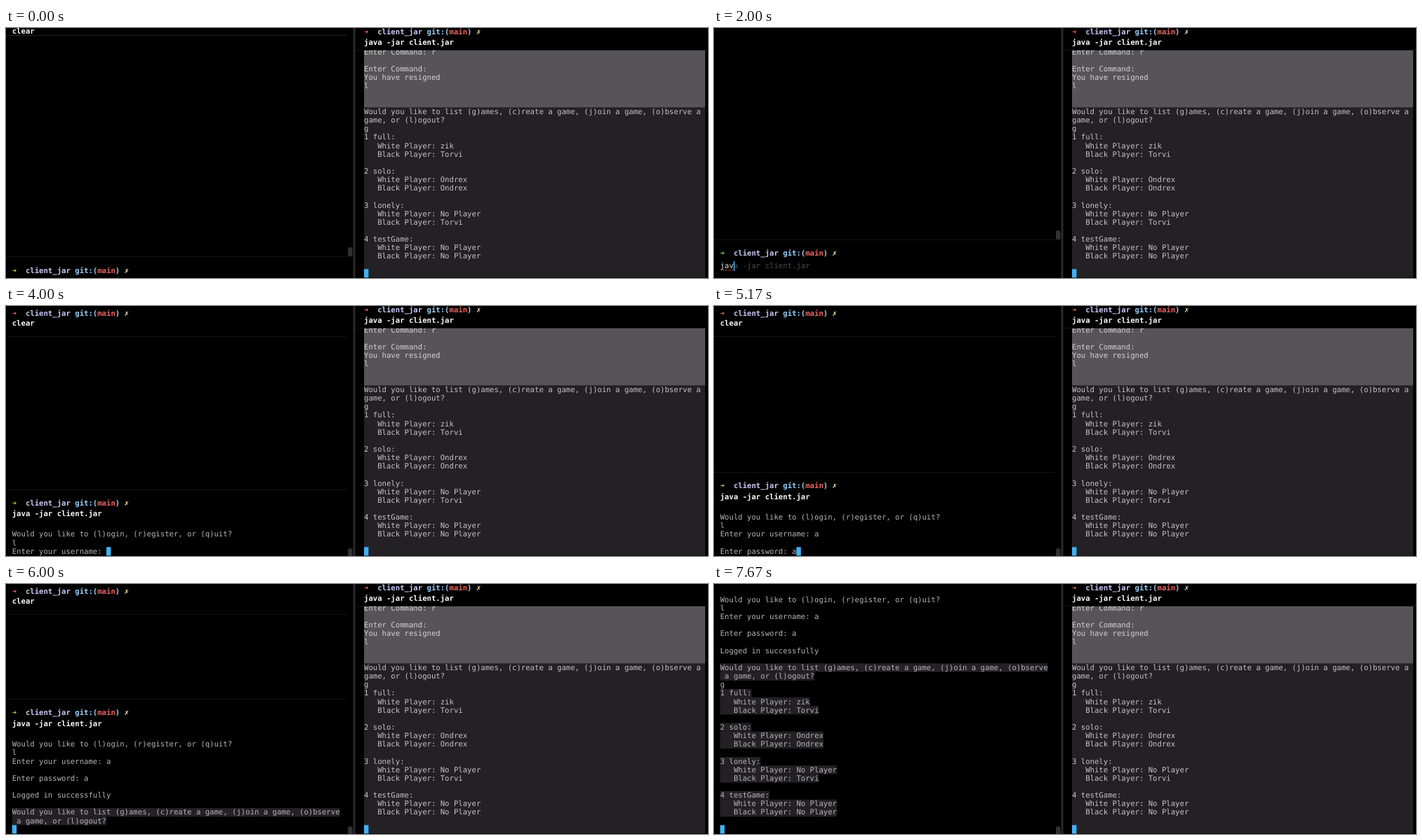
An HTML page with a canvas for the animation above (8 s loop, 1000x357 px).

```html
<!DOCTYPE html>
<html lang="en">
<head>
<meta charset="utf-8">
<title>Two terminals</title>
<style>
  html, body { margin: 0; width: 100%; height: 100%; overflow: hidden; background: #000; }
  canvas { display: block; width: 1000px; height: 357px; }
</style>
</head>
<body>
<canvas id="stage"></canvas>
<script>
const WIDTH = 1000, HEIGHT = 357, LOOP = 8000;
const ROW = 12.15, CELL = 6.395, BOTTOM = 356.4, BASELINE = 9.5;
const LEFT = 8.7, RIGHT = 510;
const TEXT = "#b4b4b4", BRIGHT = "#fafafa", CURSOR = "#3fb1f5", PANEL = "#232124", RULE = "#131313";
const COMMAND = "java -jar client.jar";

const canvas = document.getElementById("stage");
const ctx = canvas.getContext("2d");
const ratio = window.devicePixelRatio || 1;
canvas.width = WIDTH * ratio;
canvas.height = HEIGHT * ratio;
ctx.scale(ratio, ratio);
ctx.textRendering = "geometricPrecision";

const games = [
  ["full", "zik", "Torvi"],
  ["solo", "Ondrex", "Ondrex"],
  ["lonely", "No Player", "Torvi"],
  ["testGame", "No Player", "No Player"],
].map(([name, white, black], i) =>
  `${i + 1} ${name}:\n   White Player: ${white}\n   Black Player: ${black}\n\n`).join("");
const menu = "Would you like to list (g)ames, (c)reate a game, (j)oin a game, (o)bserve";

const rightLines = ("Enter Command: r\n\nEnter Command:\nYou have resigned\nl\n\n\n" +
  menu + " a\ngame, or (l)ogout?\ng\n" + games).split("\n");

// Input line before the command runs: [time, typed text, caret visible]
const typing = [
  [170, "", true], [670, "", false], [1000, "", true],
  [1670, "j", true], [1830, "ja", true], [2000, "jav", true],
  [2170, "java", true], [2330, COMMAND, true],
];
// Output of the running program: [time, appended text]
const RUN = 2500, CURSOR_SHOWN = 3000;
const output = [
  [RUN, ""],
  [2830, "\nWould you like to (l)ogin, (r)egister, or (q)uit?\n"],
  [3000, "l"],
  [3170, "\nEnter your username: "],
  [4170, "a"],
  [4500, "\n\nEnter password: "],
  [5000, "a"],
  [5330, "\n\n"],
  [5830, "Logged in successfully\n\n" + menu + "\n a game, or (l)ogout?\n"],
  [7170, "g"],
  [7500, "\n" + games],
];
const shaded = /^(Would you like to list| a game|\d |   )/;

function box(x, y, w, h, color) {
  ctx.fillStyle = color;
  ctx.fillRect(x, y, w, h);
}

// Draws text on the terminal's character grid.
function write(x, column, baseline, text, color, weight = "normal") {
  ctx.font = `${weight} ${CELL / 0.602}px "DejaVu Sans Mono", monospace`;
  ctx.fillStyle = color;
  [...text].forEach((char, i) => {
    if (char !== " ") ctx.fillText(char, x + (column + i) * CELL, baseline);
  });
}

function prompt(x, baseline, arrow) {
  const part = (column, text, color) => write(x, column, baseline, text, color, "bold");
  part(0, "➜", arrow);
  part(3, "client_jar", "#c8c9f6");
  part(14, "git:(", "#9bd0fb");
  part(19, "main", "#f0625c");
  part(23, ")", "#9bd0fb");
  part(25, "✗", "#fbeeb4");
}

function blockCursor(x, column) {
  box(x + column * CELL, BOTTOM - ROW, CELL, ROW, CURSOR);
}

function scrollThumb(y, h) {
  ctx.fillStyle = "#303030";
  ctx.beginPath();
  ctx.roundRect(487, y, 6.5, h, 3);
  ctx.fill();
}

function drawRight() {
  box(494.5, 0, 3, HEIGHT, "#2a2a2a");
  box(498, 31, 502, 1, RULE);
  prompt(RIGHT, 9, "#ee5f59");
  write(RIGHT, 0, 24, COMMAND, BRIGHT, "bold");
  ctx.save();
  ctx.beginPath();
  ctx.rect(498, 32, 502, HEIGHT - 32);
  ctx.clip();
  box(510, 32, 486, BOTTOM - 32, PANEL);
  box(510, 32, 486, 81.3, "#565457");
  const top = BOTTOM - rightLines.length * ROW;
  rightLines.forEach((line, i) =>
    write(RIGHT, 0, top + i * ROW + BASELINE, line, i < 7 ? "#d2d2d2" : "#c4c4c4"));
  blockCursor(RIGHT, 0);
  ctx.restore();
}

function drawIdle() {
  write(LEFT, 0, 8, "clear", BRIGHT, "bold");
  box(0, 10, 486, 1, "#222");
  box(0, 326, 486, 1, RULE);
  scrollThumb(313, 13.5);
  prompt(LEFT, 349.5, "#9fd648");
}

function drawInput(time) {
  const [, typed, caret] = typing.filter(step => step[0] <= time).pop();
  box(0, 302, 486, 1, RULE);
  scrollThumb(289, 13.5);
  prompt(LEFT, 325, "#7fdc4a");
  write(LEFT, 0, 343, typed, "#dedede");
  if (typed) write(LEFT, typed.length, 343, COMMAND.slice(typed.length), "#4e4e4e");
  const end = LEFT + typed.length * CELL;
  if (typed.length < 4)
    for (let x = 10; x < end - 1; x += 3) box(x, 345, 1.7, 1.2, "#e0605a");
  if (caret) box(end, 333, 1.5, 14, CURSOR);
}

function drawRunning(time) {
  const lines = output.filter(step => step[0] <= time).map(step => step[1]).join("").split("\n");
  const top = BOTTOM - lines.length * ROW;
  const rule = top - 46.2;

  const shift = Math.min(0, rule - 43);
  prompt(LEFT, 13.5 + shift, "#e8606a");
  write(LEFT, 0, 28.3 + shift, "clear", BRIGHT, "bold");
  box(0, 43 + shift, 486, 1, RULE);

  box(0, Math.round(rule), 486, 1, RULE);
  prompt(LEFT, rule + 23, "#8fdc4c");
  write(LEFT, 0, rule + 38.2, COMMAND, BRIGHT, "bold");
  lines.forEach((line, i) => {
    const y = top + i * ROW;
    if (shaded.test(line)) box(LEFT, y, line.length * CELL, ROW + 0.1, PANEL);
    write(LEFT, 0, y + BASELINE, line, TEXT);
  });
  if (time >= CURSOR_SHOWN) blockCursor(LEFT, lines[lines.length - 1].length);
  scrollThumb(346, 14);
}

function draw(time) {
  box(0, 0, WIDTH, HEIGHT, "#000");
  if (time < typing[0][0]) drawIdle();
  else if (time < RUN) drawInput(time);
  else drawRunning(time);
  drawRight();
}

const start = performance.now();
function tick() {
  draw((performance.now() - start) % LOOP);
  requestAnimationFrame(tick);
}
tick();
</script>
</body>
</html>
```
